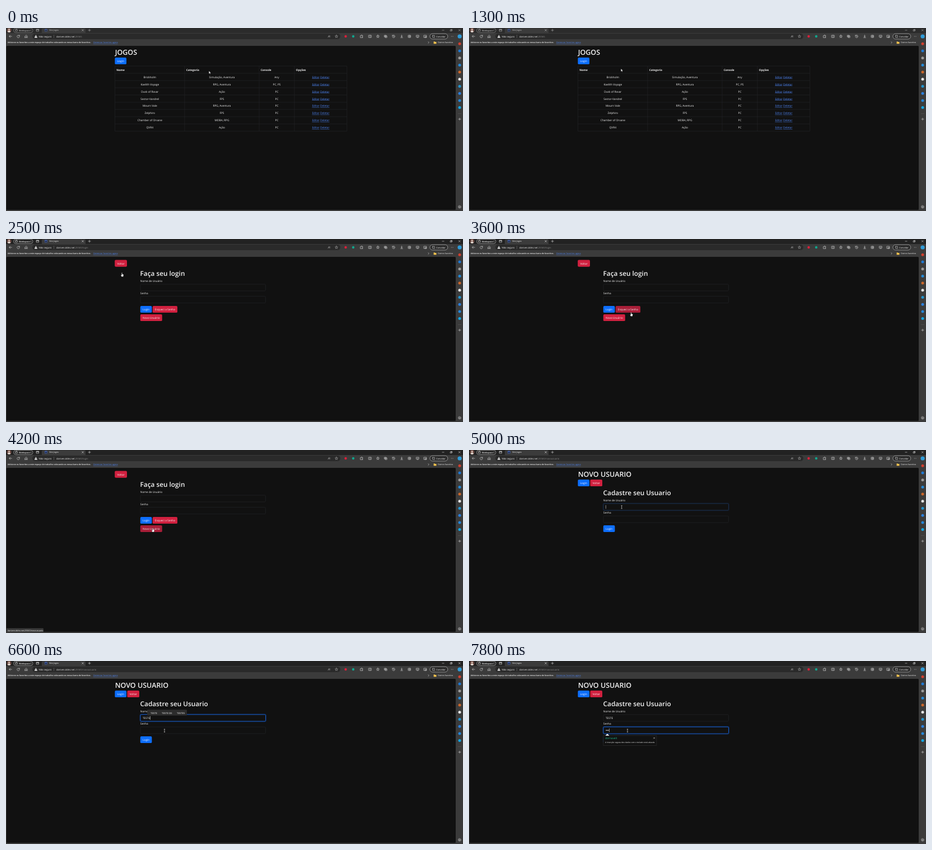
Write an HTML page that moves like this. It is 816x328 px and loops after 8 s.

```html
<!DOCTYPE html>
<html lang="pt-BR">
<head>
<meta charset="utf-8">
<title>Jogos</title>
<style>
html, body { margin: 0; width: 100%; height: 100%; overflow: hidden; background: #111; }
svg { display: block; width: 100vw; height: 100vh; }
text { font-family: "Open Sans", "Noto Sans", sans-serif; font-size: 4.82px; fill: #f4f4f4; text-rendering: geometricPrecision; white-space: pre; }
.h { font-size: 11.8px; font-weight: 600; }
.caps { font-size: 12.5px; font-weight: 600; }
.b { font-weight: 700; }
.mid { text-anchor: middle; }
.link { fill: #4f86f7; text-decoration: underline; }
.icon { fill: none; stroke: #dcdcdc; stroke-width: .6; stroke-linecap: round; stroke-linejoin: round; }
</style>
</head>
<body>
<svg id="stage" viewBox="0 0 816 328"></svg>
<script>
const BLUE = '#0d6efd', RED = '#d1203f', BG = '#111', BAR = '#3b3b3b', LINE = '#25282b';
const HOST = 'dariven.ddns.net', PORT = ':25565';
const stage = document.getElementById('stage');

// markup helpers
const rect = (x, y, w, h, fill, more = '') => `<rect x="${x}" y="${y}" width="${w}" height="${h}" fill="${fill}" ${more}/>`;
const dot = (x, y, r, fill) => `<circle cx="${x}" cy="${y}" r="${r}" fill="${fill}"/>`;
const text = (x, y, s, cls = '', size = 0, more = '') =>
  `<text x="${x}" y="${y}" class="${cls}" ${size ? `style="font-size:${size}px"` : ''} ${more}>${s}</text>`;
const icon = (x, y, d, more = '') => `<path class="icon" transform="translate(${x} ${y})" d="${d}" ${more}/>`;
const button = (id, x, y, w, label, fill) =>
  rect(x, y, w, 12.1, fill, `rx="1.9" id="${id}"`) + text(x + w / 2, y + 7.9, label, 'mid');
const input = (id, y) =>
  rect(239.3, y - .7, 224.9, 13.4, 'none', `rx="2.4" stroke="${BLUE}" stroke-width="1.3" opacity="0" id="${id}Glow"`) +
  rect(240, y, 223.5, 12, BG, `rx="1.8" stroke="${LINE}" stroke-width=".6" id="${id}"`);

const CROSS = 'M-1.5 -1.5L1.5 1.5M1.5 -1.5L-1.5 1.5';
const PLUS = 'M-2 0H2M0 -2V2';
const STAR = 'M0 -2.5L.7 -.8 2.5 -.7 1.1 .5 1.5 2.3 0 1.3 -1.5 2.3 -1.1 .5 -2.5 -.7 -.7 -.8Z';

function browser() {
  let s = rect(0, 0, 816, 328, BAR) + rect(0, 0, 816, 9, '#2b2b2b', 'id="strip"');
  s += `<path d="M64 9V2.2Q64 .5 66 .5H140Q142 .5 142 2.2V9Z" fill="${BAR}"/>`;
  s += dot(5.5, 4, 4, '#6d4a43') + dot(5.5, 2.8, 1.5, '#d8c4b8') + `<path d="M2.6 6.8Q5.5 2.4 8.4 6.8Q5.5 9 2.6 6.8Z" fill="#e4dcd6"/>`;
  s += '<g id="tabs">' + rect(13.5, .4, 34.5, 7.8, '#252525', 'rx="3.9" stroke="#c8c8c8" stroke-width=".6"');
  s += icon(18.7, 4.2, 'M-1.6 -1.4H1.6V1.6H-1.6ZM-.6 -1.4V-2.2H.6V-1.4');
  s += text(23, 5.5, 'Workspace 1', '', 3.7, 'font-weight="600"');
  s += icon(56.5, 4, 'M-2 -1.8H2V2H-2ZM-2 -.7H2M-2 -1.2H2');
  s += rect(69, 1.8, 4.6, 4.4, '#4467c4', 'rx=".6"') + rect(69.5, 3.1, 3.6, 2.5, '#26324f');
  s += text(77, 5.4, 'Site Jogos', '', 3.8);
  s += icon(137, 4, CROSS) + icon(149, 4, PLUS);
  s += icon(780.5, 4, 'M-1.6 0H1.6') + icon(795, 4, 'M-1.5 -.6H.8V1.6H-1.5ZM-.7 -.6V-1.5H1.6V.8H.8') + icon(809.7, 4, CROSS) + '</g>';

  // toolbar
  s += icon(8, 15, 'M2.3 0H-2.3M-.4 -1.9L-2.3 0 -.4 1.9');
  s += icon(22, 15, 'M2 -1A2.3 2.3 0 1 0 2.3 .6M2.2 -2.4V-.8H.6');
  s += icon(36, 15, 'M-2.1 -.4L0 -2.4 2.1 -.4V2.3H.7V.5H-.7V2.3H-2.1Z');
  s += rect(47, 10, 550, 10, '#2a2a2a', 'rx="5"');
  s += `<path d="M53.4 12.3L56.1 17.4H50.7Z" fill="#eee"/>` + rect(53.1, 14, .6, 1.8, '#2a2a2a');
  s += text(58.5, 16.6, 'Não seguro', '', 4.25) + rect(85.3, 12, .5, 6, '#777');
  s += text(90, 16.6, `${HOST}<tspan fill="#8c8c8c" id="path"></tspan>`, '', 4.15);
  s += icon(577, 15, 'M-2 1.8L-.3 -1.8 1.2 1.8M-1.4 .5H.6M1.2 -1.6Q2.2 -1 2 0', 'opacity=".6"');
  s += icon(590, 15, STAR, 'opacity=".7"');
  s += dot(606.5, 15, 2.2, '#d9203a') + dot(620, 15, 2.2, '#12a38c');
  s += icon(635, 15, 'M-2 -1.3H-.6A.8 .8 0 1 1 .8 -1.3H2V.1A.8 .8 0 1 0 2 1.3V2.3H-2Z');
  s += icon(650, 15, 'M-2.3 -2H2.3V2H-2.3ZM0 -2V2') + icon(664, 15, STAR);
  s += icon(678, 15, 'M-2.2 -2H1V1H-2.2ZM-1 1V2.2H2.2V-.8H1M-.6 -1.3V.3M-1.4 -.5H.2');
  s += icon(692, 15, 'M-1.9 -1.4A2.4 2.4 0 1 1 -2.3 .6M-2.2 -2.2V-.9H-.9M0 -1.2V.3H1.2');
  s += icon(706.5, 15, 'M0 -2.4V1M-1.5 -.4L0 1 1.5 -.4M-1.8 2.3H1.8');
  s += icon(720.5, 15, 'M-2 -2H2V2H-2ZM-2 0H2M0 -2V2');
  s += icon(735, 15, 'M-2.2 -2H2.2V1.2H-2.2ZM-1 2.2H1M0 -1V.4');
  s += icon(748.5, 15, 'M-2.2 -2H2.2V2H-2.2ZM0 0H2.2V2H0Z');
  s += rect(756.8, 10.2, 32, 9.6, '#2b2b2b', 'rx="4.8" stroke="#c8c8c8" stroke-width=".6"');
  s += icon(763.5, 15, 'M-1.8 -1.8H1.6V.6M-1.8 -1.8V1.8H.2M.8 2H2.2') + text(768, 16.5, 'Convidar', '', 4);
  for (let i = -1; i < 2; i++) s += dot(796.8 + i * 1.7, 15, .4, '#ddd');

  // favourites bar
  s += text(3, 27.3, 'Adicione os favoritos a este espaço de trabalho colocando-os nessa barra de favoritos.', '', 3.58, 'font-weight="600"');
  s += `<g style="--c:1">${text(155.7, 27.3, 'Gerenciar favoritos agora', 'link', 3.72, 'style="fill:#56a5e8"')}</g>`;
  s += icon(754.5, 26, 'M-.6 -1.4L.8 0 -.6 1.4');
  s += `<path d="M763.6 24.2H765.6L766.3 24.9H768.5V28.2H763.6Z" fill="#f2c24e"/>` + text(771, 27.3, 'Outros favoritos', '', 3.62);

  // sidebar
  s += dot(810, 15, 3.6, '#2f9bd8');
  ['#d0402f', '#1f78d1', '#9a9a9a', '#2489d6', '#c9662b', '#e6e6e6', '#2295cf', '#2b7fdc', '#2486d8', '#12a5e2']
    .forEach((c, i) => s += dot(810, 28.3 + i * 12.7, 2.5, c));
  s += rect(807, 153, 6, .4, '#666') + icon(810, 163.3, PLUS);
  s += icon(810, 320.7, 'M0 -2.4L2.1 -1.2V1.2L0 2.4 -2.1 1.2V-1.2ZM-.8 0A.8 .8 0 1 0 .8 0A.8 .8 0 1 0 -.8 0');
  return s + rect(.8, 32, 802.2, 294, BG, 'rx="1.5"');
}

function gamesPage() {
  const rows = [
    ['Brickholm', 'Simulação, Aventura', 'Any'], ['Kaelith Voyage', 'RPG, Aventura', 'PC, PS'],
    ['Dusk of Rovar', 'Ação', 'PC'], ['Sector-Vandrel', 'FPS', 'PC'], ['Mourn Vale', 'RPG, Aventura', 'PC'],
    ['Zelphiro', 'FPS', 'PC'], ['Chamber of Orvane', 'MOBA, RPG', 'PC'], ['QVR4', 'Ação', 'PC']];
  const cols = [194.5, 319, 452, 515, 608.7];
  let s = text(194.7, 48, 'JOGOS', 'caps') + button('goLogin', 194.4, 53, 20.6, 'Login', BLUE);
  let grid = cols.map(x => `M${x} 68.2V184.9`).join('');
  for (let i = 0; i < 10; i++) grid += `M194.5 ${68.2 + i * 12.97}H608.7`;
  s += `<path d="${grid}" stroke="${LINE}" stroke-width=".6"/>`;
  ['Nome', 'Categoria', 'Console', 'Opções'].forEach((h, i) => s += text(cols[i] + 2.8, 76.6, h, 'b'));
  rows.forEach((row, r) => {
    const y = 89.6 + r * 12.97;
    row.forEach((v, i) => s += text((cols[i] + cols[i + 1]) / 2, y, v, 'mid'));
    s += text(546.4, y, 'Editar', 'link') + text(561, y, 'Deletar', 'link');
  });
  return s;
}

const loginPage = () =>
  button('back', 194.2, 37.6, 21.8, 'Voltar', RED) + text(239.6, 66, 'Faça seu login', 'h') +
  text(239.8, 76.5, 'Nome de Usuário') + input('user0', 81) +
  text(239.8, 98.6, 'Senha') + input('pass0', 102.7) +
  button('enter', 239.8, 120, 20.6, 'Login', BLUE) + button('forgot', 261.8, 120, 44.2, 'Esqueci a Senha', RED) +
  button('signUp', 239.8, 135, 39, 'Novo Usuário', RED);

function signUpPage() {
  let s = text(194.7, 48, 'NOVO USUARIO', 'caps') +
    button('b1', 194.4, 53, 20.6, 'Login', BLUE) + button('b2', 216.4, 53, 21.6, 'Voltar', RED) +
    text(239.6, 81, 'Cadastre seu Usuario', 'h') +
    text(239.8, 91.7, 'Nome de Usuário') + input('user', 96) +
    text(239.8, 113.8, 'Senha') + input('pass', 118.2) +
    button('b3', 239.8, 135, 20.6, 'Login', BLUE) + text(243.9, 103.8, '', '', 0, 'id="typed"') + '<g id="dots">';
  for (let i = 0; i < 3; i++) s += dot(245 + i * 1.85, 124.3, .75, '#f4f4f4');
  s += '</g>' + rect(0, 0, .5, 6.4, '#fff', 'id="caret"');
  s += '<g id="hints">' + rect(252, 87.3, 71, 10.4, '#2c2c2c', 'rx="1" id="hintBox"') +
    text(258, 94.5, 'TESTE', '', 4.3) + text(278, 94.5, 'TESTE DE', '', 4.3) +
    text(305, 94.5, 'TESTES', '', 4.3, 'id="hint3"') + '</g>';
  s += '<g id="notice">' + rect(239.9, 133.8, 95, 17.6, BG, 'stroke="#333" stroke-width=".6"') +
    '<path d="M243.4 133.8L247 130.6 250.6 133.8Z" fill="#fff"/>' +
    text(243, 140, 'dornavelt', '', 4.8, 'fill="#1fb58a" id="brand"') + icon(330.6, 138.1, 'M-1 -1L1 1M1 -1L-1 1') +
    text(243, 147.4, 'A inserção segura dos dados com o teclado está ativada', '', 3.42) + '</g>';
  return s;
}

stage.innerHTML = browser() +
  `<g id="games">${gamesPage()}</g><g id="login">${loginPage()}</g><g id="register">${signUpPage()}</g>` +
  `<g id="status">${rect(.8, 319.4, 66, 7.4, BAR, 'rx="1"')}${text(3, 324.6, '', '', 3.7, 'id="statusText"')}</g>` +
  `<g id="pointer" stroke-linejoin="round">
    <path id="arrow" d="M0 0V5L1.2 3.9 2 5.7 2.8 5.3 2 3.6H3.6Z" fill="#fff" stroke="#000" stroke-width=".3"/>
    <path id="hand" d="M-.6 .2Q0 -.5 .6 .2V2.4L2.5 2.9Q3.1 3.1 3 3.8L2.5 5.8V6.9H-.7L-2 4.3Q-1.8 3.5 -1.1 4L-.6 4.5Z" fill="#fff" stroke="#000" stroke-width=".3"/>
    <path id="beam" d="M-1.1 -2.6H1.1M0 -2.6V2.6M-1.1 2.6H1.1" stroke="#eee" stroke-width=".6" fill="none"/>
  </g>`;

const $ = id => document.getElementById(id);
const show = (id, on) => $(id).setAttribute('display', on ? 'inline' : 'none');
const set = (id, name, v) => $(id).setAttribute(name, v);
const put = (id, s) => { if ($(id).textContent !== s) $(id).textContent = s; };
$('brand').style.fill = '#1fb58a';
$('path').style.fill = '#8c8c8c';

// time, x, y, shape from then on
const track = [
  [500, 362.3, 77, 'arrow'], [700, 352, 81, 'arrow'], [900, 325, 66, 'arrow'], [1100, 289, 55, 'arrow'],
  [1300, 271.3, 73, 'arrow'], [1400, 289, 60, 'arrow'], [1600, 262, 50, 'arrow'], [1900, 211, 58, 'hand'],
  [2100, 207, 60.5, 'hand'], [2800, 207, 60.5, 'arrow'], [3200, 240, 86, 'arrow'], [3500, 285, 126, 'hand'],
  [3600, 289.5, 131.5, 'hand'], [3700, 287, 133.5, 'arrow'], [3900, 268, 139, 'hand'], [4100, 262, 140, 'hand'],
  [4300, 262, 140, 'arrow'], [4500, 270, 108, 'beam'], [4600, 272.6, 102.3, 'beam'],
  [6300, 272.6, 102.3, 'beam'], [6600, 283, 124.8, 'beam']];

function pointer(t) {
  let i = 0;
  while (i < track.length - 1 && track[i + 1][0] <= t) i++;
  const a = track[i], b = track[i + 1] || a;
  const k = b === a ? 0 : Math.max(0, (t - a[0]) / (b[0] - a[0]));
  return { x: a[1] + (b[1] - a[1]) * k, y: a[2] + (b[2] - a[2]) * k, shape: a[3] };
}

function focus(id, k) {
  const mix = (a, b) => Math.round(a + (b - a) * k);
  set(id, 'stroke', `rgb(${mix(37, 28)},${mix(40, 94)},${mix(43, 205)})`);
  set(id, 'stroke-width', .6 + .3 * k);
  set(id + 'Glow', 'opacity', .3 * k);
}
const ramp = (t, from) => Math.min(1, Math.max(0, (t - from) / 150));

function draw(ms) {
  const t = Math.floor(ms / 100) * 100;
  const page = t < 2400 ? 'games' : t < 4300 ? 'login' : 'register';
  ['games', 'login', 'register'].forEach(p => show(p, p === page));
  put('path', PORT + { games: '', login: '/login', register: '/novousuario' }[page]);
  set('strip', 'fill', t < 2300 ? '#2b2b2b' : '#222');
  set('tabs', 'opacity', t < 2300 ? .75 : 1);

  const p = pointer(t);
  set('pointer', 'transform', `translate(${p.x} ${p.y})`);
  ['arrow', 'hand', 'beam'].forEach(s => show(s, s === p.shape));
  set('goLogin', 'fill', t >= 1900 ? '#0b5ed7' : BLUE);
  set('forgot', 'fill', t >= 3500 && t < 3700 ? '#a81e38' : RED);
  set('signUp', 'fill', t >= 3900 ? '#a81e38' : RED);
  const toLogin = t >= 2000 && t < 2400;
  show('status', toLogin || t >= 4000 && t < 4300);
  put('statusText', HOST + PORT + (toLogin ? '/login' : '/novousuario'));

  const inPass = t >= 7000;
  focus('user', inPass ? 0 : ramp(t, 4950));
  focus('pass', ramp(t, 6950));
  const count = t < 5900 ? 0 : t < 6100 ? 1 : Math.min(5, 2 + (t - 6100) / 100);
  put('typed', 'TESTE'.slice(0, count));
  const stars = [7300, 7500, 7800].filter(s => t >= s).length;
  [...$('dots').children].forEach((c, i) => c.setAttribute('display', i < stars ? 'inline' : 'none'));
  show('caret', t >= 5000 && !(t >= 5500 && t < 5900));
  const w = page === 'register' && count ? $('typed').getComputedTextLength() : 0;
  set('caret', 'x', inPass ? 244.2 + stars * 1.95 : 243.9 + w);
  set('caret', 'y', inPass ? 121 : 98.9);

  show('hints', t >= 6200 && t < 7000);
  set('hintBox', 'width', t < 6800 ? 71 : 89.5);
  put('hint3', t < 6800 ? 'TESTES' : 'TESTE PARA');
  show('notice', t >= 7100);
}

const start = performance.now();
function tick() {
  draw((performance.now() - start) % 8000);
  requestAnimationFrame(tick);
}
draw(0);
requestAnimationFrame(tick);
</script>
</body>
</html>
```
